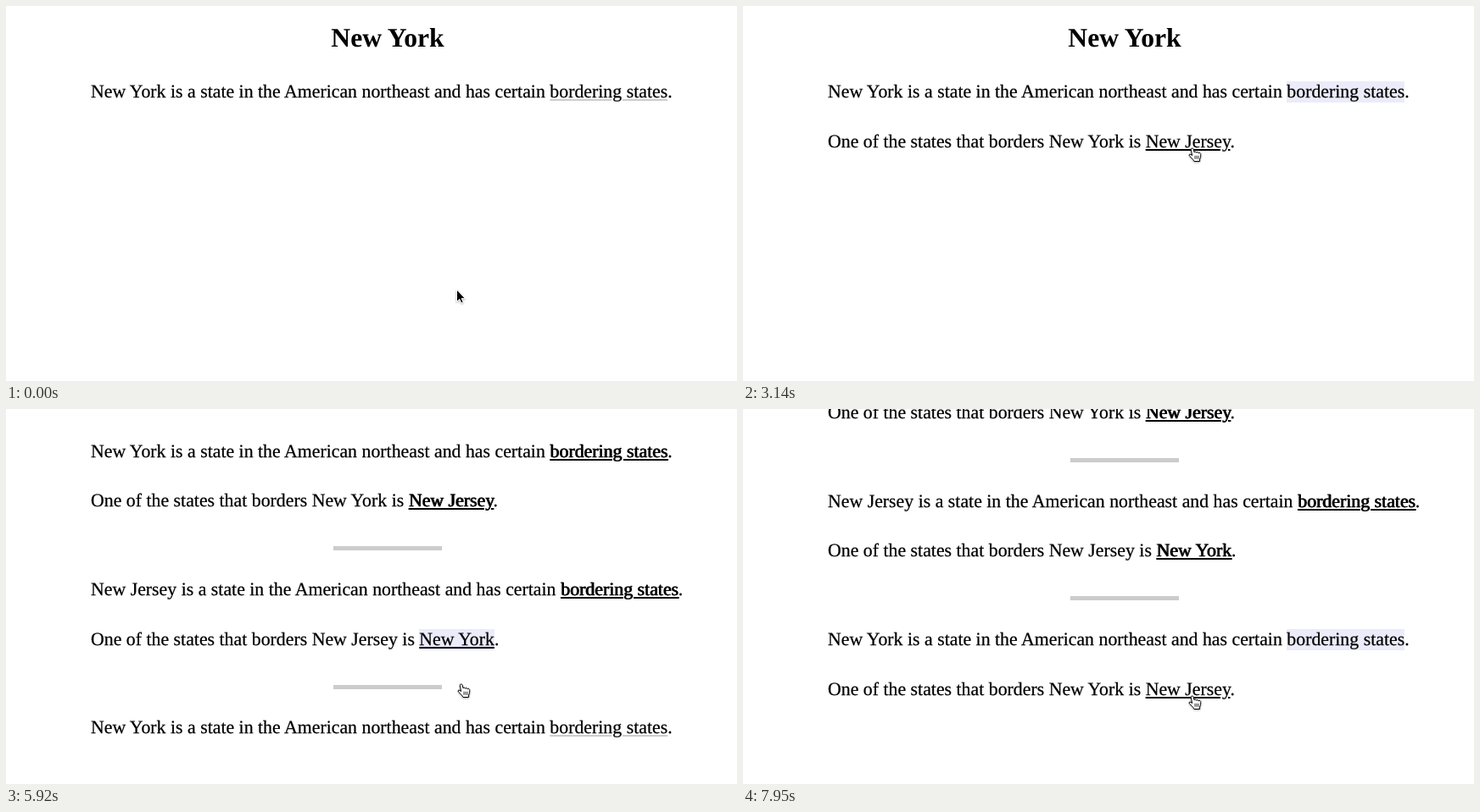
These frames come from a looping animation (862 by 443 pixels, 8 s). An HTML page:

```html
<!DOCTYPE html>
<html lang="en">
<head>
<meta charset="utf-8">
<title>Bordering states</title>
<style>
  html, body { margin: 0; width: 100%; height: 100%; overflow: hidden; background: #fff; }
  body { position: relative; color: #000; font-family: "Liberation Serif", "Times New Roman", serif; text-rendering: geometricPrecision; }
  #page { position: absolute; left: 100px; top: 0; width: 700px; }
  h1, p, hr { position: absolute; margin: 0; white-space: nowrap; }
  h1 { top: 20px; width: 100%; font-size: 31.7px; line-height: 36px; text-align: center; }
  p { font-size: 21.84px; line-height: 24px; -webkit-text-stroke: .25px #000; }
  hr { left: 286px; width: 128px; height: 5px; border: 0; background: #ccc; }
  p span { padding-bottom: 1px; text-decoration: underline #ccc 2px; text-underline-offset: 1.5px; }
  p .clicked { background: #ebebfa; text-decoration-color: transparent; }
  p .done { text-shadow: .8px 0 #000; text-decoration-color: #000; }
  p .hover { text-decoration-color: #000; }
  #cursor { position: absolute; left: 0; top: 0; overflow: visible; filter: drop-shadow(0 1px 1px #0005); }
</style>
</head>
<body>
<div id="page"><h1>New York</h1></div>
<svg id="cursor" width="1" height="1">
  <path id="arrow" d="M.5 0V14.4L3.8 11.3L5.9 16L8.2 15L6.2 10.4H10.4Z" stroke="#fff"/>
  <g id="hand" fill="#fff" stroke="#000" stroke-linejoin="round" stroke-linecap="round">
    <path d="M-1.7 1.4Q-1.7 0-.4 0Q.9 0 1.2 1.2L2.2 5Q2.4 3.9 3.6 4.2Q4.6 4.4 4.8 5.4Q5.2 4.3 6.3 4.7Q7.3 5 7.4 6Q8 5 9 5.6Q9.9 6.2 9.8 7.6Q9.9 11 8.6 13V15.5H2Q1 13.5-1 11.5L-3.6 9Q-4.6 7.6-3.2 7.1Q-2 6.9-.6 8.4Z"/>
    <path d="M3 9.2V12.4M5 9.2V12.4M7 9.2V12.4" stroke-width=".8"/>
  </g>
</svg>
<script>
const LOOP = 8000;
const clicks = [2290, 3440, 4560, 5790, 6960];
const hovers = [[1920, 2530], [3080, 3800], [4340, 4880], [5400, 6060], [6570, 7180], [7890, LOOP]];
const scrolls = [[5776, 62], [6948, 94]]; // start, distance
const SCROLL_TIME = 198;
// start, end, control point, end point
const moves = [
  [1410, 1960, 600, 215, 687, 111],
  [2470, 3140, 600, 317, 530, 168],
  [3740, 4410, 600, 375, 684, 271],
  [4820, 5490, 610, 440, 537, 325],
  [6000, 6670, 630, 420, 685, 378],
  [7400, 7950, 600, 437, 530, 339]
];

const page = document.getElementById('page');
const cursor = document.getElementById('cursor');
const arrow = document.getElementById('arrow');
const hand = document.getElementById('hand');

const clamp = x => Math.min(1, Math.max(0, x));
const swing = x => (1 - Math.cos(Math.PI * clamp(x))) / 2;
const within = (t, [from, to]) => t >= from && t < to;

function add(tag, top) {
  const element = document.createElement(tag);
  element.style.top = top + 'px';
  return page.appendChild(element);
}

const lines = hovers.map((hover, i) => {
  const block = i >> 1;
  const offset = block * 163.4;
  const [state, neighbour] = block % 2 ? ['New Jersey', 'New York'] : ['New York', 'New Jersey'];
  const parts = [];
  let lead, label;
  if (i % 2) {
    lead = `One of the states that borders ${state} is `;
    label = neighbour;
  } else {
    lead = `${state} is a state in the American northeast and has certain `;
    label = 'bordering states';
    if (block) parts.push(add('hr', 50.5 + offset));
  }
  const row = add('p', 89.3 + offset + (i % 2) * 58.5);
  const link = document.createElement('span');
  link.textContent = label;
  row.append(lead, link, '.');
  parts.push(row);
  return { parts, link, hover };
});

function cursorAt(t) {
  let x = 531, y = 335;
  for (const [start, end, cx, cy, ex, ey] of moves) {
    if (t < start) break;
    const k = swing((t - start) / (end - start));
    const curve = (a, b, c) => (1 - k) ** 2 * a + 2 * k * (1 - k) * b + k * k * c;
    x = curve(x, cx, ex);
    y = curve(y, cy, ey);
  }
  return [x, y];
}

function draw(t) {
  lines.forEach(({ parts, link, hover }, i) => {
    const shown = !i || t >= clicks[i - 1];
    for (const part of parts) part.style.display = shown ? '' : 'none';
    const state = t >= clicks[i + 1] ? 'done' : t >= clicks[i] ? 'clicked' : '';
    link.className = state + (within(t, hover) ? ' hover' : '');
  });

  const scroll = scrolls.reduce((sum, [start, distance]) =>
    sum + distance * swing((t - start) / SCROLL_TIME), 0);
  page.style.top = -scroll + 'px';

  const pointing = hovers.some(hover => within(t, hover));
  arrow.style.display = pointing ? 'none' : '';
  hand.style.display = pointing ? '' : 'none';
  const [x, y] = cursorAt(t).map(Math.round);
  cursor.style.transform = `translate(${x}px, ${y}px)`;
}

const begin = performance.now();
function tick() {
  draw((performance.now() - begin) % LOOP);
  requestAnimationFrame(tick);
}
tick();
</script>
</body>
</html>
```
